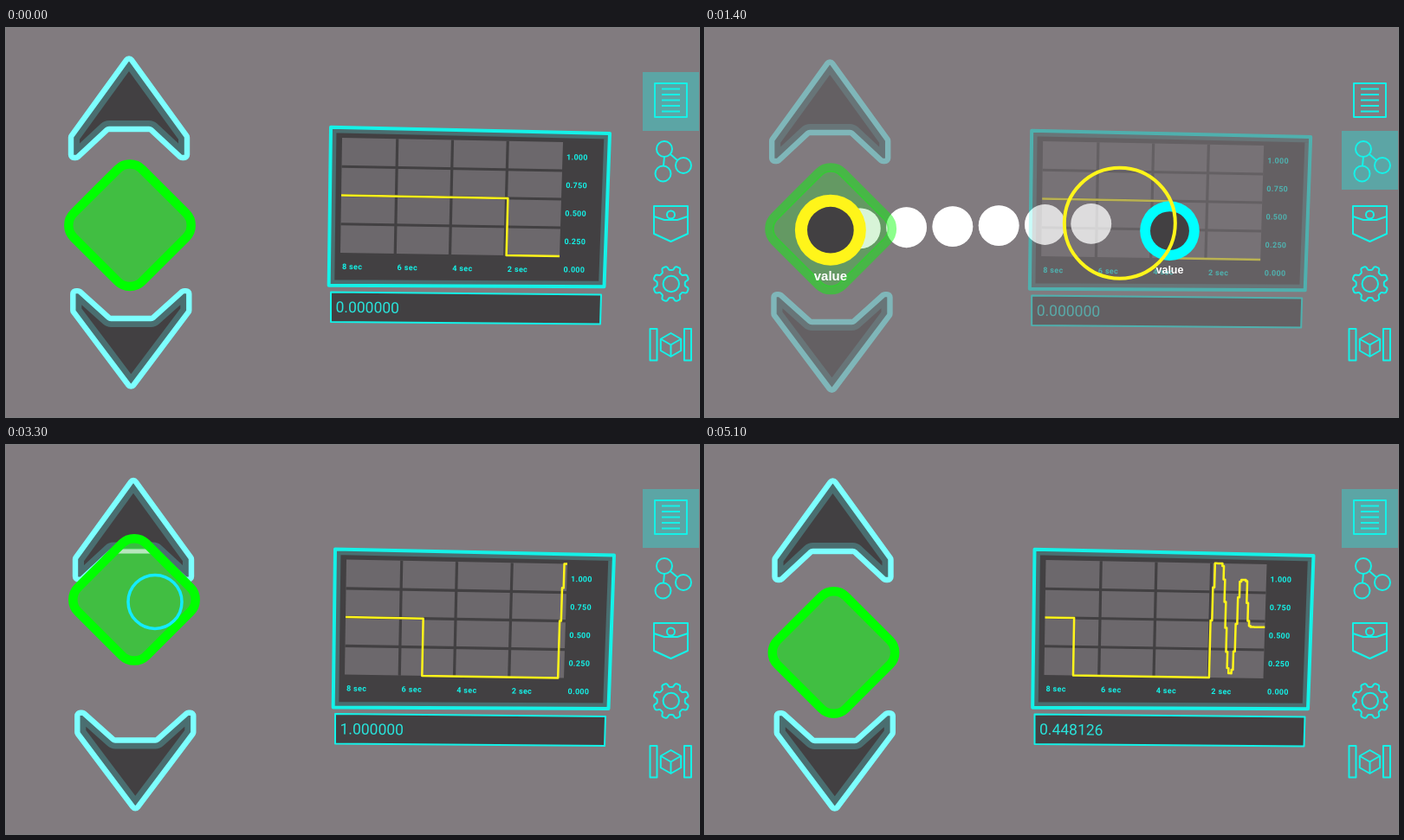
Recreate the animation shown at these times as an HTML page with a canvas. Size 800 px wide and 450 px high, loop 5200 ms.

```html
<!DOCTYPE html>
<html lang="en">
<head>
<meta charset="utf-8">
<title>Slider and graph</title>
<style>
html, body { margin: 0; width: 100%; height: 100%; overflow: hidden; background: #817b7f; }
canvas { display: block; width: 800px; height: 450px; }
</style>
</head>
<body>
<canvas id="stage" width="800" height="450"></canvas>
<script>
const LOOP = 5200, STEP = 100;
const LINK_ON = 500, LINK_OFF = 2300;
const DRAG_ON = 800, DRAG_TIME = 800, DRAG_OFF = 1700;
const TOUCH_ON = 3000, TOUCH_OFF = 4500;
const DROP = -1980, SPAN = 8160, HOLD = 55;
const BG = '#817b7f', DARK = '#424042', BAND = '#4a6e70', CELL = '#6c686c';
const CYAN = '#14f2e8', PALE = '#7dffff', YELLOW = '#fff51a', RING = '#0ff';

const stage = document.getElementById('stage').getContext('2d');
const layer = document.createElement('canvas');
layer.width = 800;
layer.height = 450;
const objects = layer.getContext('2d');
let c = stage;

// hand-held camera drift: time, x, y
const SWAY = [[0, 0, 0], [1000, 3.7, 4.3], [1900, 0, 3.6], [2600, 3, 4.4],
  [3300, 5, 5.6], [4400, 8, 9], [5100, 5.5, 6]];
// turning points of the slider: time, value
const VALUE = [[3080, .5], [3180, 1], [3430, 1], [3790, .04], [3870, .04],
  [4150, .86], [4330, .86], [4460, .5], [4530, .448126]];

const lerp = (a, b, p) => a + (b - a) * p;
const clamp = p => Math.min(1, Math.max(0, p));
const ease = p => (1 - Math.cos(Math.PI * clamp(p))) / 2;

function track(keys, t, i = 1) {
  const k = keys.findIndex(key => key[0] >= t);
  if (k < 0) return keys[keys.length - 1][i];
  if (k === 0) return keys[0][i];
  const a = keys[k - 1], b = keys[k];
  return lerp(a[i], b[i], ease((t - a[0]) / (b[0] - a[0])));
}
const signal = t => t < DROP ? .5 : t < VALUE[0][0] ? 0 : track(VALUE, t);

function poly(pts, closed = true) {
  c.beginPath();
  pts.forEach(([x, y]) => c.lineTo(x, y));
  if (closed) c.closePath();
}
function rounded(pts, r) {
  const [a, b] = [pts[0], pts[pts.length - 1]];
  c.beginPath();
  c.moveTo((a[0] + b[0]) / 2, (a[1] + b[1]) / 2);
  pts.forEach((p, i) => c.arcTo(...p, ...pts[(i + 1) % pts.length], r));
  c.closePath();
}
function fill(color) { c.fillStyle = color; c.fill(); }
function stroke(color, width) { c.strokeStyle = color; c.lineWidth = width; c.stroke(); }
function line(pts, color, width) { poly(pts, false); stroke(color, width); }
function circle(x, y, r) { c.beginPath(); c.arc(x, y, r, 0, 7); }
function text(str, x, y, font, color, spacing = '0px') {
  c.save();
  c.translate(x, y);
  c.rotate(.013);
  c.font = font;
  c.letterSpacing = spacing;
  c.fillStyle = color;
  c.fillText(str, 0, 0);
  c.restore();
}

function framed(pts, r, edge, width, band) {
  rounded(pts, r);
  fill(DARK);
  c.save();
  c.clip();
  stroke(BAND, band);
  c.restore();
  stroke(edge, width);
}

function arrow(x, y, dir) {
  const half = [[67, 92.5], [67, 117], [60, 117], [24.5, 84]];
  const at = side => ([dx, dy]) => [x + side * dx, y + dir * dy];
  framed([[x, y], ...half.map(at(1)), ...half.map(at(-1)).reverse()], 3.5, PALE, 6.4, 20);
}

function diamond(y, half, r) {
  rounded([[143, y - half], [143 + half, y], [143, y + half], [143 - half, y]], r);
}

function slider(y) {
  arrow(142, 33, 1);
  arrow(144.3, 417, -.965);
  c.save();
  diamond(y, 74, 16);
  fill('rgba(55,202,57,.86)');
  c.clip();
  line([[118, 117.5], [167, 117.5]], 'rgba(225,238,225,.75)', 5);
  c.restore();
}

// graph plane: u to the right, v upward
const plot = (u, v) => [386 + 2 * v + u * (253 + 2 * v), 260 - 133 * v + u * (4 + v)];

function graph(t) {
  framed([[375, 114.8], [697, 122], [690.5, 299.3], [372.7, 297.8]], 0, CYAN, 4, 13);
  poly([plot(0, 0), plot(0, 1), plot(1, 1), plot(1, 0)]);
  fill(CELL);
  for (const k of [.25, .5, .75]) {
    line([plot(k, 0), plot(k, 1)], DARK, 3.2);
    line([plot(0, k), plot(1, k)], DARK, 3.2);
  }

  const at = time => 1 - (t - time) / SPAN;
  const pts = [plot(0, .5), plot(at(DROP), .5), plot(at(DROP), 0)];
  let last = 0;
  for (let s = VALUE[0][0]; s <= t; s += HOLD) {
    pts.push(plot(at(s), last));
    last = signal(s);
    pts.push(plot(at(s), last));
  }
  pts.push(plot(1, last));
  line(pts, YELLOW, 2.5);

  const small = 'bold 9px Roboto, sans-serif';
  for (let v = 0; v <= 1; v += .25)
    text(v.toFixed(3), 643.5 + 3.5 * v, 282.5 - 130 * v, small, CYAN, '0.3px');
  for (let i = 0; i < 4; i++)
    text(8 - 2 * i + ' sec', 388 + 63.6 * i, 279 + i, small, CYAN, '0.35px');

  poly([[375, 305.5], [687, 308.5], [686, 342.5], [375, 340]]);
  fill(DARK);
  stroke(CYAN, 2);
  text(signal(t + 60).toFixed(6), 380.5, 328.8, '17.5px Roboto, sans-serif', '#28e4dc');
}

function node(x, y, r, color) {
  circle(x, y, r);
  fill(color);
  circle(x, y, r * .655);
  fill(DARK);
  c.font = `bold ${r * .365}px "Liberation Sans", Arial, sans-serif`;
  c.textAlign = 'center';
  c.fillStyle = '#fff';
  c.fillText('value', x, y + r * 1.43);
  c.textAlign = 'left';
}

function finger(t) {
  const p = clamp((t - DRAG_ON) / DRAG_TIME);
  return [lerp(142.5, 534, ease(p)), 229.5 - 11 * Math.sin(Math.PI * p)];
}

function beads(t, alpha) {
  const [x, y] = finger(t), len = x - 142.5, gap = 53.3;
  const r = 23.4 * Math.min(1, len / 150);
  c.globalAlpha = alpha;
  for (let d = (t * .11 + 40.5) % gap; d < len; d += gap) {
    circle(142.5 + d, lerp(228.5, y, d / len), r);
    fill('#fff');
  }
  c.globalAlpha = 1;
}

function icons(linking) {
  c.fillStyle = '#5ca5a5';
  c.fillRect(735, linking ? 119 : 51, 65, 68);

  // list
  c.beginPath();
  c.rect(749, 64, 37, 39);
  for (let y = 70.5; y < 100; y += 6.5) {
    c.moveTo(757, y);
    c.lineTo(778, y);
  }
  stroke(CYAN, 2);

  // linked nodes
  for (const [x, y] of [[760, 140], [782, 159], [758.5, 168.5]]) {
    circle(x, y, 9);
    stroke(CYAN, 2);
  }
  line([[760, 149], [759, 159.5]], CYAN, 2);
  line([[767, 146], [775, 153]], CYAN, 2);

  // pocket
  poly([[748, 206], [787, 206], [787, 238], [767.5, 247], [748, 238]]);
  stroke(CYAN, 2);
  line([[748, 218], [760, 222], [775, 222], [787, 218]], CYAN, 2);
  circle(767.5, 216, 4.5);
  stroke(CYAN, 2);

  // gear
  const gear = [];
  for (let i = 0; i < 160; i++) {
    const a = i * Math.PI / 80, r = 18.4 - 2.4 * Math.tanh(2.5 * Math.cos(8 * a));
    gear.push([767.8 + r * Math.cos(a), 296 + r * Math.sin(a)]);
  }
  poly(gear);
  stroke(CYAN, 2);
  circle(767.8, 296, 9.2);
  stroke(CYAN, 2);

  // boxed cube
  const mid = [767.5, 366.5];
  const corner = i => [mid[0] + 13.5 * Math.sin(i * Math.PI / 3), mid[1] - 13.5 * Math.cos(i * Math.PI / 3)];
  poly([0, 1, 2, 3, 4, 5].map(corner));
  stroke(CYAN, 2);
  for (const i of [1, 3, 5]) line([mid, corner(i)], CYAN, 2);
  c.strokeRect(743.5, 348, 8, 36.5);
  c.strokeRect(783, 348, 8, 36.5);
}

function begin(ctx) {
  c = ctx;
  c.lineJoin = 'round';
  c.setTransform(1, 0, 0, 1, 0, 0);
  c.clearRect(0, 0, 800, 450);
}

function draw(t) {
  const linking = t >= LINK_ON && t < LINK_OFF;
  const dragging = t >= DRAG_ON && t < DRAG_OFF;
  const linked = linking && t >= DRAG_ON;
  const dx = track(SWAY, t), dy = track(SWAY, t, 2);
  const y = 228.3 + (.5 - track(VALUE, t + 120)) * 110;
  const solid = linking ? .45 : 1;

  begin(objects);
  c.translate(dx, dy);
  slider(y);
  graph(t);

  begin(stage);
  c.fillStyle = BG;
  c.fillRect(0, 0, 800, 450);
  icons(linking);
  c.translate(dx, dy);
  if (linked) beads(t, 1);
  c.globalAlpha = solid;
  c.drawImage(layer, -dx, -dy);
  c.globalAlpha = 1;
  if (linked) beads(t, .5);
  c.globalAlpha = solid;
  diamond(y, 79, 20);
  stroke('#0f0', 10.5);
  c.globalAlpha = 1;

  if (linking) {
    node(142.7, 229.7, 41, dragging ? YELLOW : RING);
    node(534.3, 230.6, 34.3, RING);
  }
  if (dragging) {
    circle(...finger(t), 64);
    stroke(YELLOW, 4);
  }
  if (t >= TOUCH_ON && t < TOUCH_OFF) {
    circle(167 - (t - 3300) / 50, y + 2.5, 31);
    stroke('#14ebff', 3.5);
  }
}

const start = performance.now();
function tick() {
  const t = Math.max(0, performance.now() - start) % LOOP;
  draw(Math.floor(t / STEP) * STEP);
  requestAnimationFrame(tick);
}
tick();
</script>
</body>
</html>
```
